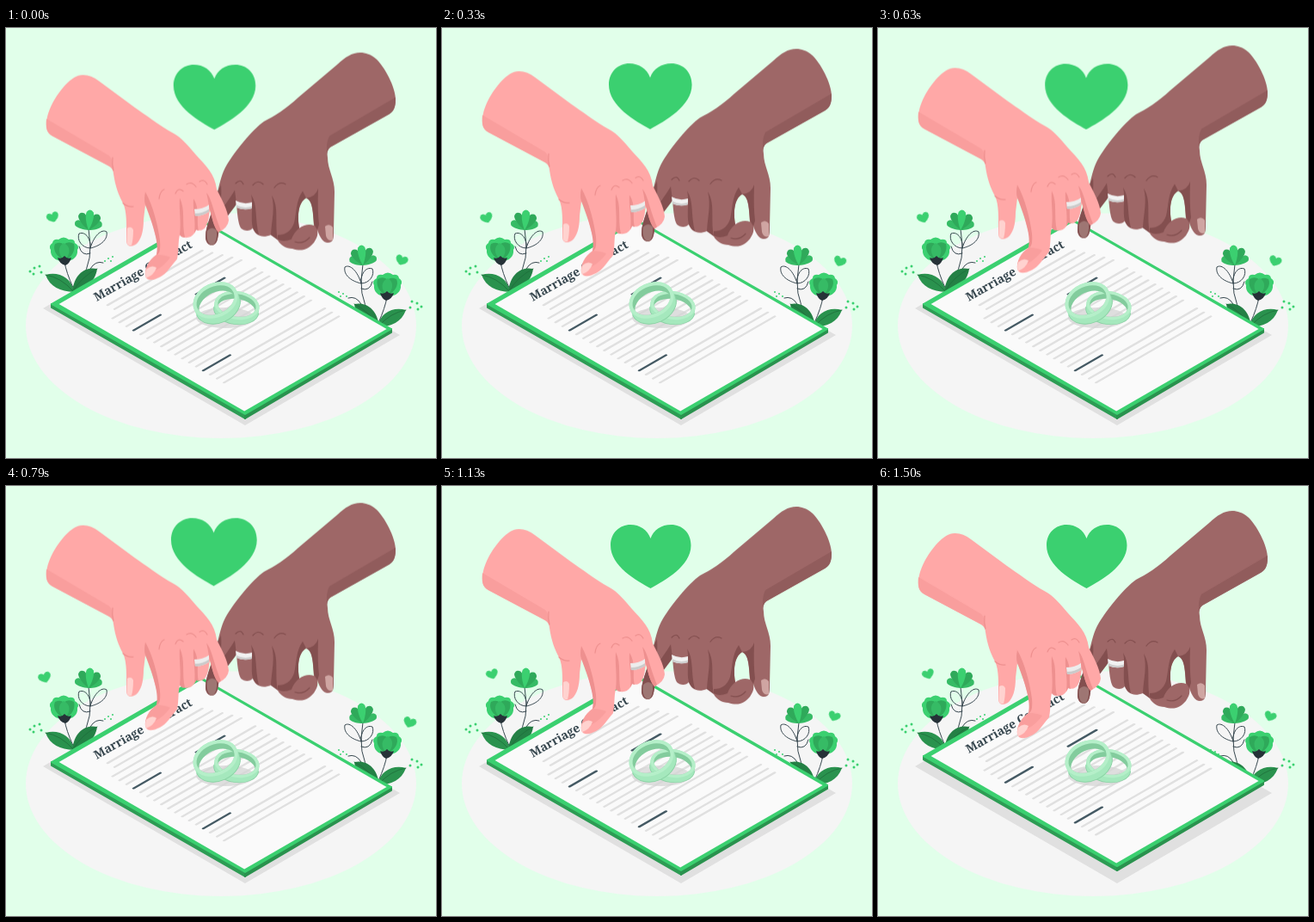
Animation of 500 by 500 pixels, one loop 1.54 s. Source, as an HTML page:

```html
<!DOCTYPE html>
<html lang="en">
<head>
<meta charset="utf-8">
<title>Marriage contract</title>
<style>
html, body { margin: 0; width: 100%; height: 100%; overflow: hidden; background: #e1ffea; }
svg { display: block; width: 100%; height: 100%; }

.hands, .hearts, .board { animation: 1540ms linear -30ms infinite; }
.hands { animation-name: float; }
.hearts { animation-name: beat; transform-origin: 257px 160px; fill: #3bd070; }
.board { animation-name: lift; }

@keyframes float {
  50% { transform: translateY(-10px); }
}
@keyframes beat {
  0%, 30%, 40%, 60%, 100% { transform: scale(1); }
  10%, 50% { transform: scale(1.1); }
}
@keyframes lift {
  0%, 65% { transform: translateY(0); }
  100% { transform: translateY(-7px); }
}

.title { font: bold 13.8px "Noto Serif", "Liberation Serif", serif; fill: #37474f; }
.line { fill: none; stroke-linecap: round; }
.pink { fill: #ffa8a7; }
.pink-band { fill: #f99e9d; }
.pink-dim { fill: #ee908f; }
.pink-line { stroke: #ee908f; stroke-width: 1.2; }
.brown { fill: #9e6767; }
.brown-band { fill: #915c5c; }
.brown-dim { fill: #834f4f; }
.brown-line { stroke: #834f4f; stroke-width: 1.2; }
.stem { stroke: #37474f; stroke-width: 1; }
</style>
</head>
<body>
<svg viewBox="0 0 500 500">
  <defs>
    <path id="heart" d="M242.5 119C226 110 196 93 196 69C196 54 207 45 219 45C230 45 239 51 242.5 61C246 51 255 45 266.5 45C279 45 289.5 54 289.5 69C289.5 93 259 110 242.5 119Z"/>
    <path id="petal" d="M0 0C-3-6-6-16-4-21Q0-26 4-21C6-16 3-6 0 0Z"/>

    <g id="plant">
      <path class="line stem" d="M68 272Q70 284 78 302M78 302Q99 284 98 252L96 234M98 256C88 256 82 246 85 239C93 236 99 246 98 256C102 242 111 233 117 237C119 247 108 254 98 256M98 262Q88 266 85 254M98 280Q104 270 113 273"/>
      <path fill="#2a924e" d="M46 287C60 283 76 289 79 307C63 306 51 301 46 287Z"/>
      <path fill="#248045" d="M106 280C92 277 79 286 77 307C92 304 104 295 106 280Z"/>
      <path class="line" stroke="#1f6e3c" stroke-width=".8" d="M46 287Q64 290 78 306Q88 289 106 280"/>
      <path fill="#3bd070" d="M68 271C59 272 51 266 52 258Q49 253 54 250Q55 245 61 246Q67 241 73 246Q80 245 80 250Q86 253 83 258C84 266 77 272 68 271Z"/>
      <path fill="#2fa95a" d="M68 270C58 266 54 257 57 251Q64 248 67 252Q72 247 79 251C81 258 77 267 68 270Z"/>
      <path fill="#36bb65" d="M68 270C60 263 60 254 67 250C75 253 76 263 68 270Z"/>
      <path fill="#263238" d="M60 267Q65 269 68 265Q71 269 76 267Q74 274 69 276Q62 274 60 267Z"/>
      <g transform="translate(96 235)">
        <use href="#petal" fill="#36bb65" transform="rotate(-58) scale(.9 .78)"/>
        <use href="#petal" fill="#36bb65" transform="rotate(60) scale(.9 .75)"/>
        <use href="#petal" fill="#2fa95a" transform="rotate(-25) scale(1 .94)"/>
        <use href="#petal" fill="#2fa95a" transform="rotate(34) scale(1 .92)"/>
        <use href="#petal" fill="#3bd070" transform="rotate(5)"/>
      </g>
      <path class="line" stroke="#3bd070" stroke-width="3" d="M28 283h0M33 279h0M39 277h0M32 286h0M41 284h0"/>
      <path class="line" stroke="#3bd070" stroke-width="2" d="M115 271h0M119 268h0M124 266h0M122 271h0"/>
    </g>

    <!-- One band: wall, light rim, see-through opening -->
    <clipPath id="hole"><ellipse rx="23" ry="16"/></clipPath>
    <mask id="open" maskUnits="userSpaceOnUse" x="-40" y="-40" width="80" height="80">
      <path fill="#fff" d="M-40-40H40V40H-40Z"/>
      <g clip-path="url(#hole)"><ellipse cy="7" rx="23" ry="16"/></g>
    </mask>
    <g id="band" mask="url(#open)">
      <path fill="#a5e8bd" d="M-27 0A27 20 0 0 1 27 0V7A27 20 0 0 1-27 7Z"/>
      <path class="line" stroke="#8bd3a5" d="M-27 7A27 20 0 0 0 27 7"/>
      <ellipse rx="27" ry="20" fill="#b5efc9"/>
      <ellipse rx="23" ry="16" fill="#83cc9d"/>
    </g>
  </defs>

  <rect width="500" height="500" fill="#e1ffea"/>
  <ellipse cx="250" cy="346" rx="227" ry="131" fill="#f5f5f5"/>
  <path fill="#e0e0e0" d="M43 326L278 462L458 357L223 222Z"/>

  <use href="#plant"/>
  <use href="#plant" transform="translate(511 41) scale(-1 1)"/>

  <g class="hearts">
    <use href="#heart"/>
    <use href="#heart" transform="translate(58.500 219) rotate(-20) scale(.15) translate(-242.7 -82)"/>
    <use href="#heart" transform="translate(456 268) rotate(20) scale(.15) translate(-242.7 -82)"/>
  </g>

  <g class="board">
    <g stroke-width="2" stroke-linejoin="round">
      <path fill="#2d9c54" stroke="#2d9c54" d="M53 321L278 449V454L53 325Z"/>
      <path fill="#2a924e" stroke="#2a924e" d="M278 449L448 350V354L278 454Z"/>
      <path fill="#3bd070" stroke="#3bd070" d="M53 321L225 222L448 350L278 449Z"/>
    </g>
    <g transform="matrix(.866 -.5 .866 .5 104 318)">
      <rect x="-27.500" y="-21.500" width="191" height="249" fill="#fafafa"/>
      <path id="lines" class="line" stroke="#e0e0e0" stroke-width="2.7"/>
      <path class="line" stroke="#455a64" stroke-width="2.7" d="M-8 59.2H28M76 59.2H114M-8 152.700H28"/>
    </g>
    <text class="title" transform="translate(105.500 318) rotate(-29.500)">Marriage Contract</text>
  </g>

  <ellipse cx="255" cy="337" rx="34" ry="12" fill="#d5d5d5" opacity=".75"/>
  <use href="#band" transform="translate(268.500 322.500) rotate(8) scale(.97 .82)"/>
  <use href="#band" transform="translate(243.500 316.500) rotate(-24)"/>

  <g class="hands">
    <g transform="translate(0 1)">
      <path class="brown" fill-rule="evenodd" d="M412 28C402 28 395 33 385 42L340 80C326 93 312 102 300 108C286 118 267 142 257 158C251 168 249 178 246 190C243 208 232 228 232 242C232 249 236 252 240 252C247 250 246 242 248 233C252 224 262 213 268 204C269 216 270 227 273 232C277 236 284 236 287 232C290 241 298 244 308 240C312 243 315 243 316 246C319 252 326 256 333 256C345 260 352 256 358 249C362 243 363 239 362 234C365 243 369 249 374 249C381 249 381 244 381 236L382 190C382 174 374 164 374 150Q372 142 377 138L443 101C451 97 453 92 453 83C453 68 440 44 430 35C424 30 418 28 412 28ZM349 197C356 199 357 212 358 229Q350 226 341 232C339 219 339 203 349 197Z"/>
      <path class="brown-band" d="M374 150C372 140 373 131 376 125L453 80C453 92 451 97 443 101L377 138Q372 142 374 150Z"/>
      <path class="brown-dim" d="M246 190C243 208 232 228 232 242C232 249 236 252 240 252C247 250 246 242 248 233C252 224 262 213 268 204L266 188C256 204 250 212 245 215C250 204 251 194 250 182Z"/>
      <path fill="#9e7673" d="M234 235Q240 229 245 235Q246 249 240 252Q232 250 234 235Z"/>
      <path class="brown-dim" d="M287 232C284 220 288 205 285 193C293 205 289 221 294 240Q289 237 287 232Z"/>
      <path class="brown-dim" d="M308 240C309 222 313 210 309 194C318 208 312 225 316 246Q312 243 308 240Z"/>
      <path class="brown-dim" d="M316 240Q330 240 335 226C338 214 337 200 345 189L349 197C339 203 339 219 341 232Q334 238 332 245Q322 249 316 245Z"/>
      <path class="brown-dim" d="M349 197Q360 196 363 186Q362 212 364 228L362 234Q358 228 358 226C357 210 356 200 349 197Z"/>
      <path class="line brown-line" d="M267 180Q273 174 276 181M287 182Q293 175 299 181M312 185Q318 177 325 181M336 248Q346 251 353 243"/>
      <path fill="#cfa5a2" d="M371 230Q376 226 380 231L380 246Q374 248 372 241Z"/>
      <path fill="#f2f2f2" d="M267 200Q276 205 286 202L286 209Q277 212 268 208Z"/>
      <path fill="#cfcfcf" d="M267.500 205Q277 210 286 206.500V209Q277 212 268 208Z"/>
    </g>
    <g transform="translate(0 1)">
      <path class="pink" d="M90 54C77 53 62 72 54 87C49 97 47 104 47 112C47 119 49 122 54 125L118 159Q125 162 125 169C127 183 131 194 136 203C141 213 140 230 140 248C141 254 146 254 151 251C157 246 160 236 160 222L162 205C168 217 171 230 174 241C177 251 177 257 175 263C166 269 161 279 162 288C164 294 171 293 179 289C187 285 192 276 199 268C201 258 200 248 202 240C207 245 215 244 219 238Q221 235 221 234C226 236 231 234 233 229C236 223 236 216 237 211C240 220 241 230 247 237Q258 232 259 223C258 211 251 199 245 187C243 169 232 159 221 147C211 135 204 127 195 122C177 112 162 100 150 92L108 61Q99 54 90 54Z"/>
      <path class="pink-band" d="M47 105L120 148Q125 152 125 169Q125 162 118 159L54 125C47 121 46 115 47 105Z"/>
      <path class="pink-dim" d="M162 205Q160 199 162 190C171 206 177 230 179 247C180 258 178 263 175 263C178 250 172 231 162 205Z"/>
      <path class="pink-dim" d="M202 240C204 224 201 211 202 197C209 211 204 226 208 243Q204 243 202 240Z"/>
      <path class="pink-dim" d="M219 238C221 223 217 210 218 198C226 210 221 224 224 235L221 234Z"/>
      <path class="pink-dim" d="M237 211C235 202 235 198 233 191C239 197 241 213 250 235L247 237C241 230 240 220 237 211Z"/>
      <path class="pink-band" d="M175 263Q184 263 191 266Q183 277 174 281Q165 283 162 288C161 279 166 269 175 263Z"/>
      <path fill="#ffd2cf" d="M163 280Q169 274 175 278Q172 287 163 290Q161 286 163 280Z"/>
      <path fill="#ffd2cf" d="M141 232Q146 229 148 234Q148 245 146 252Q141 253 140.500 248Z"/>
      <path class="line pink-line" d="M178 198Q179 189 184 187M197 192Q200 184 206 189M210 181Q216 177 221 184M225 178Q230 174 234 181M124 150Q123 158 125 165M136 203Q142 208 148 207"/>
      <path fill="#ededed" d="M219 210Q229 210 236 205L236 213Q229 218 220 218Z"/>
      <path fill="#cacaca" d="M219.500 215Q229 215 236 210V213Q229 218 220 218Z"/>
    </g>
  </g>
</svg>
<script>
const headings = [5, 15];
const rows = Array.from({ length: 19 }, (_, i) => {
  if (headings.includes(i)) return "";
  const from = i < 2 ? 4 : -8;
  const to = Math.min(131 + 4 * i, 146);
  return `M${from} ${12.4 + 9.35 * i}H${to}`;
});
document.getElementById("lines").setAttribute("d", rows.join(""));
</script>
</body>
</html>
```
